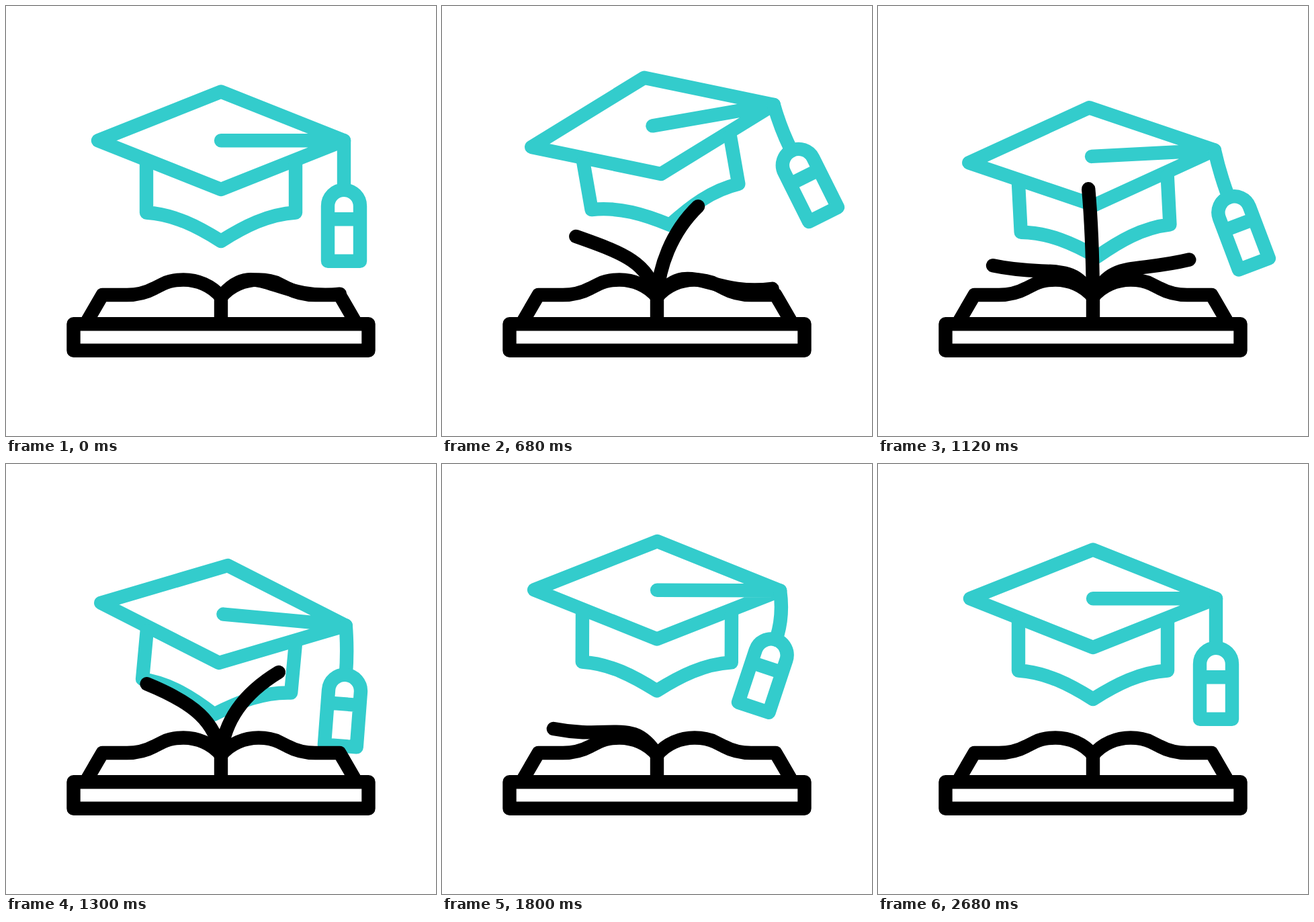
Animation of 640 by 640 pixels, one loop 3020 ms. Source, as an HTML page:

```html
<!DOCTYPE html>
<html lang="en">
<head>
<meta charset="utf-8">
<title>Graduation cap over an open book</title>
<style>
html, body { margin: 0; height: 100%; overflow: hidden; background: #fff; }
svg { display: block; width: 100%; height: 100%; }
path { fill: none; stroke: inherit; stroke-width: 20.4; stroke-linecap: round; stroke-linejoin: round; }
</style>
</head>
<body>
<svg viewBox="0 0 640 640">
  <g id="cap" stroke="#3cc">
    <path d="M320 127.5 503 200.3 320 273 137 200.3zM320 200.3H503"/>
    <path d="M209 235V307.5C250 310 285 328 320 350C355 328 390 310 431 307.5V235"/>
    <path id="string"/>
    <path id="tag" d="M-24 24a24 24 0 0 1 48 0v82h-48zM-24 43.5h48"/>
  </g>
  <g id="book" stroke="#000">
    <path d="M100.5 473.3h439v39.4h-439zM320 433v40"/>
    <path id="left" d="M122 467 143.500 430H180C194 430 208 427 221 420L233 414C243 409 253 407.500 264 407.500C285 407.500 306 416 320 433"/>
    <use href="#left" transform="matrix(-1 0 0 1 640 0)"/>
  </g>
</svg>
<script>
const LOOP = 3020, PAGES = 4, STAGGER = 330, FLIP = 900, RAISE = 280, STRING = 73.5;
const $ = id => document.getElementById(id);
const rad = deg => deg * Math.PI / 180;
const lerp = (a, b, s) => a + (b - a) * s;
const smooth = s => s * s * (3 - 2 * s);

// Eases from each value to the next, then holds the last
function sway(t, times, values) {
  const i = times.findIndex(time => time > t);
  if (i < 1) return values[i ? values.length - 1 : 0];
  return lerp(values[i - 1], values[i], smooth((t - times[i - 1]) / (times[i] - times[i - 1])));
}
const liftTimes = [0, 600, 1200, 1800, 2400, 2680];
const tiltTimes = [240, 840, 1440, 2040, 2640];
const tasselTimes = [400, 900, 1660, 2240, 2680];

// A page is one curve from the spine: two handles and its tip
const rest = [50, 372, 80, 440, 177, 429];
const raised = [5, 385, 35, 350, 105, 319];
const upright = [0, 395, 0, 320, 0, 269];
const pages = Array.from({ length: PAGES }, () =>
  $('book').appendChild(document.createElementNS('http://www.w3.org/2000/svg', 'path')));

function pagePath(t) {
  if (t <= 0 || t >= FLIP) return '';
  const side = t < FLIP / 2 ? 1 : -1, rise = Math.min(t, FLIP - t);
  const [from, to, s] = rise < RAISE
    ? [rest, raised, rise / RAISE]
    : [raised, upright, (rise - RAISE) / (FLIP / 2 - RAISE)];
  const curve = from.map((v, i) => {
    const p = lerp(v, to[i], s);
    return i % 2 ? p : 320 + side * p;
  });
  return `M320 433C${curve}`;
}

function draw(t) {
  const lift = sway(t, liftTimes, [0, -25, 26, -12.5, 4, 0]);
  const tilt = sway(t, tiltTimes, [0, -12, 8, -4, 0]);
  $('cap').setAttribute('transform', `translate(0 ${lift}) rotate(${tilt} 320 238)`);

  // The tag hangs from the cap's corner and swings further than its string
  const swing = rad(sway(t, tasselTimes, [0, -18.8, 6, -4, 0]));
  const turn = sway(t, tasselTimes, [0, -28, 22, -4, 0]);
  const x = 503 - STRING * Math.sin(swing), y = 200.3 + STRING * Math.cos(swing);
  const bendX = x + STRING / 2 * Math.sin(rad(turn)), bendY = y - STRING / 2 * Math.cos(rad(turn));
  $('string').setAttribute('d', `M503 200.3Q${bendX} ${bendY} ${x} ${y}`);
  $('tag').setAttribute('transform', `translate(${x} ${y}) rotate(${turn})`);

  pages.forEach((page, i) => page.setAttribute('d', pagePath(t - i * STAGGER)));
}

const start = performance.now();
(function tick() {
  draw((performance.now() - start) % LOOP);
  requestAnimationFrame(tick);
})();
</script>
</body>
</html>
```
